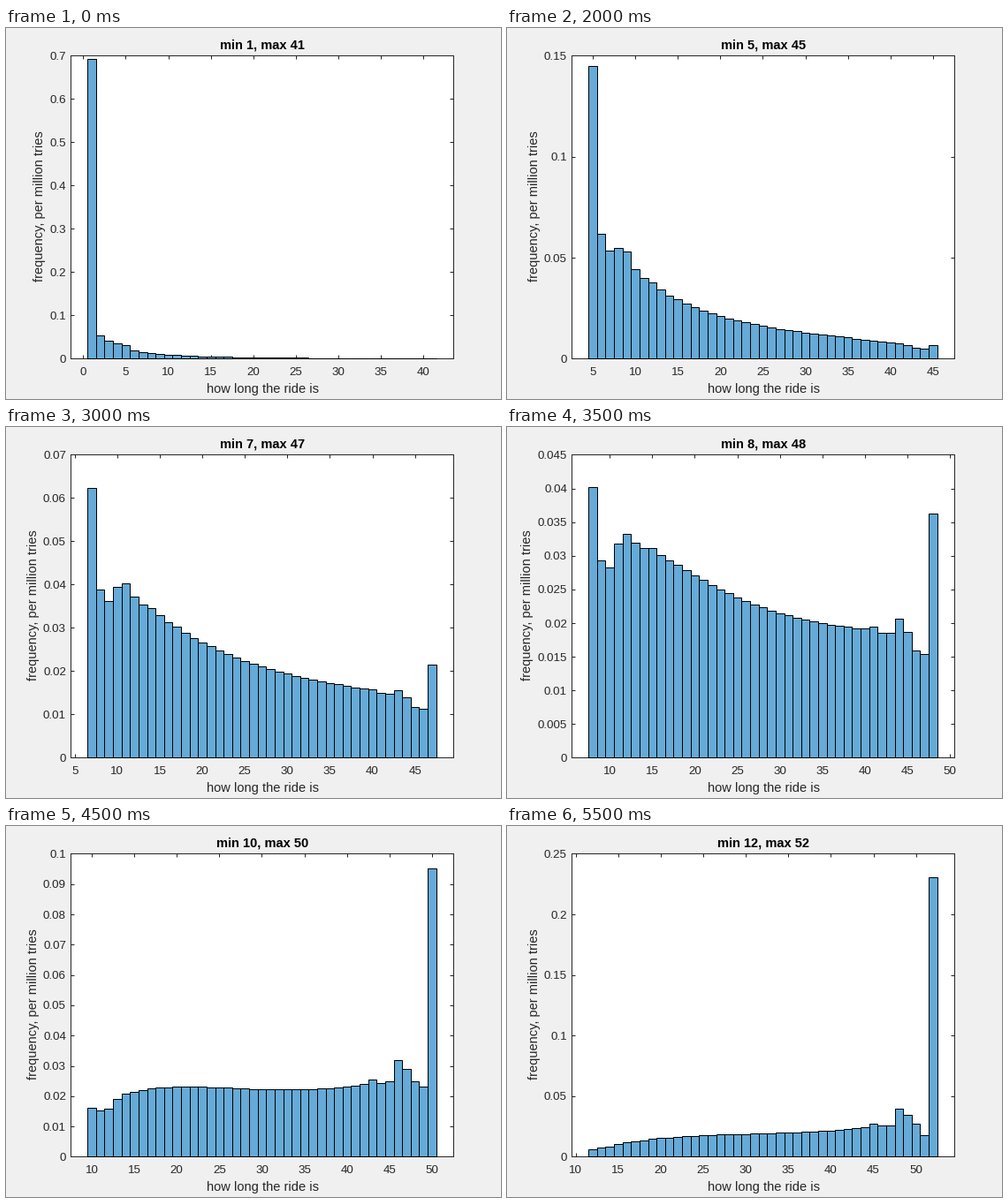
A matplotlib script that plays this animation: 560x420 px, repeating every 6000 ms.

```python
from itertools import product
from math import ceil, comb, prod

import matplotlib.pyplot as plt
import numpy as np
from matplotlib.animation import FuncAnimation

W, H, DPI = 560, 420, 100
PX = 72 / DPI  # points per pixel
LEFT, RIGHT, TOP, BOTTOM = 72.95, 505.95, 31.4, 374.4
INK = "#262626"
TICK_SIZE, LABEL_SIZE = 13.33, 14.67
DIGIT_WIDTH = 7.41

plt.rcParams["font.family"] = "Liberation Sans"
fig = plt.figure(figsize=(W / DPI, H / DPI), dpi=DPI, facecolor="#f0f0f0")


def ride_lengths(start):
    """Chance of each ride length from start to start + 40 cards.

    Cards are turned from a 52-card deck; a jack, queen, king or ace
    lengthens the ride by 1, 2, 3 or 4. The factor start / length
    keeps only the draws that end for the first time at that length.
    """
    chance = np.zeros(41)
    for counts in product(range(5), repeat=4):
        extra = sum(v * c for v, c in enumerate(counts, 1))
        length = start + extra
        hands = prod(comb(4, c) for c in counts) * comb(36, length - sum(counts))
        chance[extra] += start / length * hands / comb(52, length)
    return chance


def write(x, y, text, size, color=INK, ha="center", **style):
    fig.text(x / W, 1 - y / H, text, fontsize=size * PX, color=color,
             ha=ha, va="baseline", **style)


def draw(frame):
    fig.clear()
    start = frame + 1
    chance = ride_lengths(start)
    peak = chance.max()
    step = next(s for s in (0.005, 0.01, 0.05, 0.1) if peak <= 10 * s)
    intervals = ceil(peak / step)
    x_min, x_max = start - 2.5, start + 42.5
    x_ticks = [x for x in range(0, 60, 5) if x_min <= x <= x_max]
    y_ticks = [i * step for i in range(intervals + 1)]

    ax = fig.add_axes([LEFT / W, 1 - BOTTOM / H,
                       (RIGHT - LEFT) / W, (BOTTOM - TOP) / H])
    ax.set(xlim=(x_min, x_max), ylim=(0, intervals * step),
           xticks=x_ticks, yticks=y_ticks)
    ax.set_axisbelow(True)
    ax.tick_params(direction="in", length=4.3 * PX, width=PX, color=INK,
                   top=True, right=True, labelbottom=False, labelleft=False)
    for spine in ax.spines.values():
        spine.set(linewidth=PX, edgecolor=INK)
    ax.bar(np.arange(start, start + 41), chance, width=1, color="#66aad7",
           edgecolor="black", linewidth=PX, zorder=3, clip_on=False)

    for x in x_ticks:
        px = LEFT + (x - x_min) / (x_max - x_min) * (RIGHT - LEFT)
        write(px, 393, str(x), TICK_SIZE)
    names = [f"{y:.4g}" for y in y_ticks]
    for i, name in enumerate(names):
        py = BOTTOM - i / intervals * (BOTTOM - TOP)
        write(68, py + 4.6, name, TICK_SIZE, ha="right")

    widest = (max(map(len, names)) - 0.5) * DIGIT_WIDTH
    write(60.8 - widest, 202, "frequency, per million tries", LABEL_SIZE,
          rotation=90, rotation_mode="anchor")
    write(290.5, 413, "how long the ride is", LABEL_SIZE)
    write(290, 24, f"min {start}, max {start + 40}", LABEL_SIZE,
          color="black", weight="bold")
    return []


anim = FuncAnimation(fig, draw, frames=12, interval=500, init_func=lambda: [],
                     repeat=True, repeat_delay=0)
plt.show()
```
